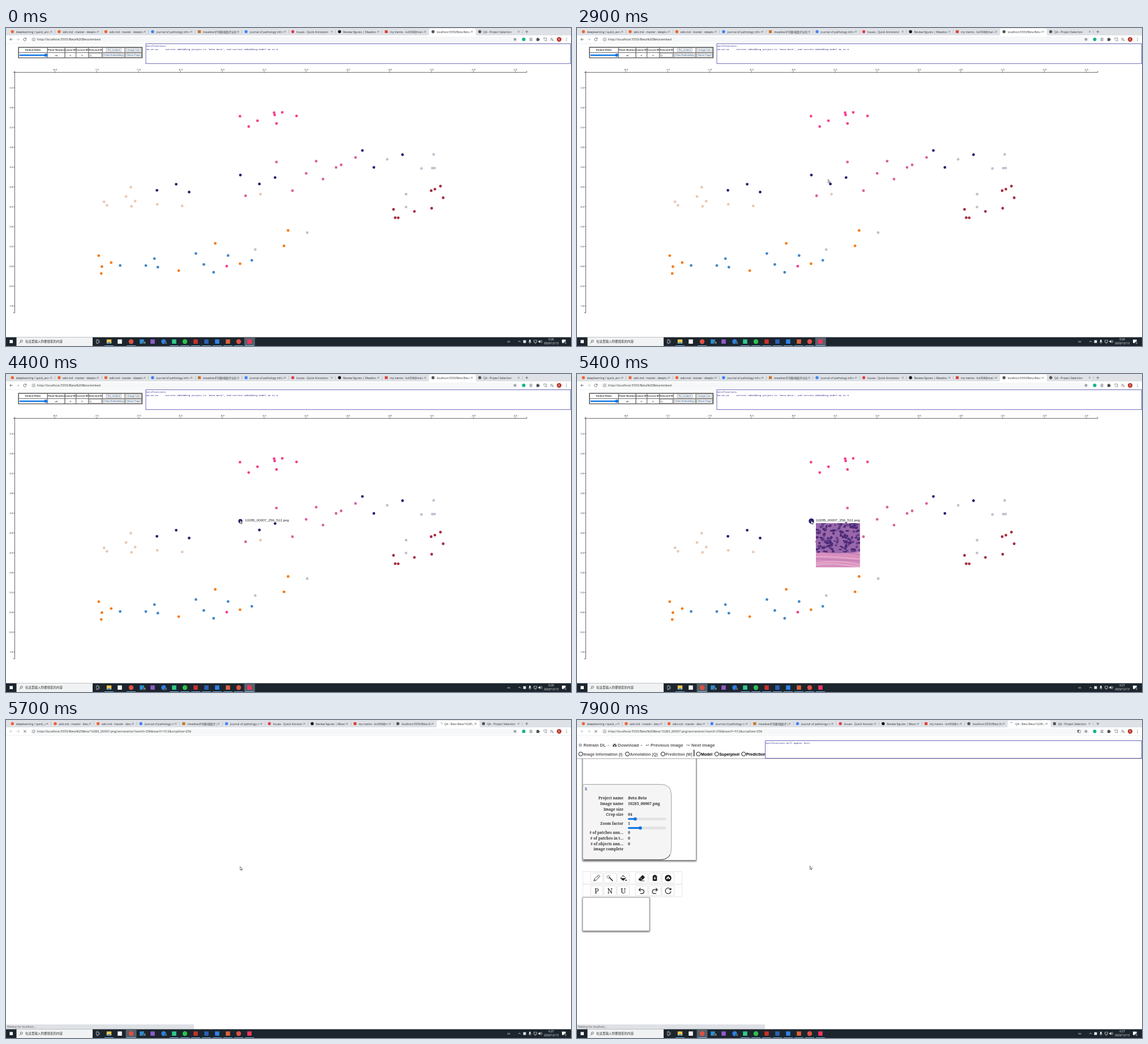
Write an HTML page that moves like this. It is 998 px wide and 561 px high and loops after 8 s.

```html
<!DOCTYPE html>
<html lang="en">
<head>
<meta charset="utf-8">
<title>Embedding viewer</title>
<style>
html, body { margin: 0; width: 100%; height: 100%; overflow: hidden; background: #fff; }
svg { display: block; }
text { white-space: pre; }
.ui { font-family: "Open Sans", "Noto Sans CJK SC", "Noto Sans CJK", sans-serif; }
.page { font-family: "Liberation Sans", Arial, sans-serif; }
.mono { font-family: "Liberation Mono", monospace; }
.serif { font-family: "Noto Serif", serif; }
.sym { font-family: "DejaVu Sans", sans-serif; }
.bold { font-weight: bold; }
</style>
</head>
<body>
<svg id="stage" width="998" height="561" viewBox="0 0 998 561"></svg>
<script>
const LOOP = 8000, STEP = 100;
const PROJECT = 'Beta Beta';
const HOST = 'http://localhost:5555/Beta%20Beta/';

// markup helpers
const rect = (x, y, w, h, fill, more = '') =>
  `<rect x="${x}" y="${y}" width="${w}" height="${h}" fill="${fill}" ${more}/>`;
const circle = (x, y, r, fill, more = '') =>
  `<circle cx="${x}" cy="${y}" r="${r}" fill="${fill}" ${more}/>`;
const line = (d, color, width = 0.8, more = '') =>
  `<path d="${d}" fill="none" stroke="${color}" stroke-width="${width}" ${more}/>`;
const shape = (d, fill) => `<path d="${d}" fill="${fill}"/>`;
const text = (x, y, s, size, cls, fill = '#222', more = '') =>
  `<text x="${x}" y="${y}" font-size="${size}" class="${cls}" fill="${fill}" ${more}>${s.replace(/&/g, '&amp;')}</text>`;
const group = (id, body, more = '') => `<g id="${id}" ${more}>${body}</g>`;
const MID = 'text-anchor="middle"', END = 'text-anchor="end"';
const edge = (color, width = 0.6) => `stroke="${color}" stroke-width="${width}"`;

function random(seed) {
  return () => (seed = (seed * 16807) % 2147483647) / 2147483647;
}

// browser window
const ORANGE = '#f0652f', GREY = '#5f6368';
const TABS = [
  ['deeplearning / quick_annotator', ORANGE],
  ['wiki.md · master · deeplearning', ORANGE],
  ['wiki.md · master · deeplearning', ORANGE],
  ['journal of pathology informatics', '#3b82f6'],
  ['meadow子刊影响因子分数出炉', '#c8762c', true],
  ['journal of pathology informatics', '#4285f4'],
  ['Issues · Quick Annotator', '#e04050'],
  ['Review figures | Meadow Field', '#111'],
  ['my memo - kvt508@mail.example', '#d9483b', true],
  [`localhost:5555/${PROJECT}/embed`, '#555'],
  ['QA - Project Selection', '#555']
];

function tabStrip(tabs, pitch, active) {
  let out = rect(0, 0, 998, 13, '#dee1e6');
  tabs.forEach(([title, color, square], i) => {
    const x = 11.3 + i * pitch, on = i === active, w = pitch - 20;
    if (on) out += shape(`M${x - 9} 13q2 0 2-2V3q0-2 2-2h${pitch - 4}q2 0 2 2v8q0 2 2 2z`, '#fff');
    else if (i !== active - 1) out += rect(x + pitch - 7.5, 3.5, 0.5, 6, '#9a9fa6');
    if (color) out += square ? rect(x - 2.6, 4, 5.2, 5, color) : circle(x, 6.5, 2.7, color);
    out += `<svg x="${x + 6.3}" y="0" width="${w}" height="13">` +
      text(0, 8.5, title, 5, 'ui', '#30343a') +
      rect(w - 8, 0, 8, 13, `url(#fade${on ? 1 : 0})`) + '</svg>';
    const c = x + pitch - 13.8;
    out += line(`M${c - 1.4} 5.1l2.8 2.8m0-2.8l-2.8 2.8`, '#50555b', 0.6);
  });
  return out + line('M917.3 6.6h5.2m-2.6-2.6v5.2', GREY, 0.8);
}

function windowFrame() {
  return rect(0, 13, 998, 14.5, '#fff') +
    rect(42, 15, 863, 10.6, '#f6f7f8', 'rx="5.3"') +
    rect(0, 27.2, 998, 0.5, '#dcdee1') +
    circle(48.9, 20.2, 2.5, 'none', edge(GREY)) + line('M48.9 19.8v1.8m0-3v.6', GREY, 0.6) +
    line('M950.8 6h4.4M969 4.5h3v3h-3zM970 4.4v-.9h3v3h-.9M987 3.5l4 4m0-4l-4 4', '#333', 0.6) +
    shape('M899 17l.9 2 2.1.2-1.6 1.4.5 2.1-1.9-1.1-1.9 1.1.5-2.1-1.6-1.4 2.1-.2z', GREY) +
    circle(899, 20.3, 0.9, '#fff') +
    circle(914.5, 20, 3.1, '#16b58a') +
    rect(924.8, 17.3, 4.8, 5.6, '#a4a8ad') + line('M925.6 19h3.2m-3.2 1.8h3.2', '#fff', 0.5) +
    rect(937, 18.2, 4.6, 4.6, '#4a4e53') + circle(939.3, 18, 1.1, '#4a4e53') + circle(941.8, 20.4, 1.1, '#4a4e53') +
    line('M949.7 19v-1.3h5.2v4.8h-2.4M949.7 20.2q2 .3 2.4 2.3', GREY, 0.7) +
    line('M961.5 18.2h4m-4 1.8h4m-4 1.8h2', GREY, 0.7) + circle(966, 21.5, 1, GREY) +
    circle(977, 20.1, 4.2, '#b8392c') + text(977, 21.8, 'K', 4.6, 'ui', '#fff', MID) +
    [17.8, 20, 22.2].map(y => circle(990, y, 0.6, '#4a4e53')).join('');
}

function navigation(loading) {
  const back = loading ? '#b6b9bd' : '#44484d';
  return line('M11.6 20.1H6.8m2.2-2.3l-2.3 2.3 2.3 2.3', back, 0.8) +
    line('M18.6 20.1h4.8m-2.2-2.3l2.3 2.3-2.3 2.3', '#b6b9bd', 0.8) +
    (loading ? line('M31.3 18l4.2 4.2m0-4.2l-4.2 4.2', '#44484d', 0.9)
      : line('M35.3 18.6a2.5 2.5 0 1 0 .5 2.2M35.8 17.3v2h-2', '#44484d', 0.8));
}

// taskbar
function taskbar() {
  const icons = [
    [201, '#f4f4f4', 1], [221, '#dd5144'], [240, '#2b8fd8', 1], [259, '#8f5bc8', 1], [278.5, '#2f7fe0'],
    [297, '#2fc98c', 1], [316, '#2dc14a'], [335, '#c8302c', 1], [354, '#2b5fb4', 1],
    [373, '#2f82e8', 1], [392, '#d8633c', 1], [411, '#dd5144'], [430, '#f0365f', 1]
  ];
  const running = [182, 221, 297, 316, 335, 354, 373, 392, 411, 430];
  return rect(0, 545.5, 998, 15.5, '#1c252d') +
    rect(6.4, 550.4, 5.6, 5.6, '#fff') +
    rect(18.5, 545.5, 134.5, 15.5, '#f1f2f3') +
    circle(27.3, 552.4, 1.9, 'none', edge('#333', 0.7)) + line('M26 553.8l-2.4 2.6', '#333', 0.7) +
    text(34, 555.4, '在这里输入你要搜索的内容', 5.5, 'ui', '#333') +
    rect('', 545.5, 19, 15.5, '#57616a', 'id="activeApp"') +
    line('M159.5 551h3.8v4.4h-3.8zM165 550.5v5.4M159.5 549.6h3.8m-3.8 7.2h3.8', '#dfe3e6', 0.6) +
    rect(177.8, 549.5, 8.4, 7, '#f4c84e') + rect(179.5, 554, 5, 2.5, '#3e9be0') +
    icons.map(([x, c, sq]) => sq ? rect(x - 3.8, 549.4, 7.6, 7.6, c) : circle(x, 553.2, 4.2, c)).join('') +
    circle(244, 555.5, 2.9, '#303a42') + text(244, 557.2, '14', 4.4, 'ui', '#fff', MID) +
    circle(282.4, 555.8, 2.3, '#303a42') + text(282.4, 557.4, '3', 4.2, 'ui', '#fff', MID) +
    running.map(x => rect(x - 8, 560, 16, 1, '#76b9ed')).join('') +
    text(888, 554.8, 'EK', 4.2, 'ui', '#fff', MID) +
    line('M904.8 554.2l2.2-2.2 2.2 2.2', '#fff', 0.7) + rect(913.6, 550.8, 4.8, 4.8, '#e8ecef') +
    rect(924.2, 549.8, 2.4, 4.4, '#fff', 'rx="1.2"') + line('M923.2 553q0 2.4 2.2 2.4t2.2-2.4m-2.2 2.4v1.4', '#fff', 0.5) +
    line('M932.5 550.8h5v3.6h-5zm1 5.4h3', '#fff', 0.6) +
    shape('M940.5 552h1.3l1.8-1.6v5.4l-1.8-1.6h-1.3z', '#fff') + line('M944.6 551.4q1.4 1.7 0 3.4m1.2-4.4q2.2 2.7 0 5.4', '#fff', 0.5) +
    text(963, 551.4, '', 4.9, 'ui', '#fff', MID + ' id="clock"') +
    text(963, 558.3, '2020/12/13', 4.9, 'ui', '#fff', MID) +
    shape('M982 549.8h6.6v5.4h-4l-1.4 1.5v-1.5H982z', '#fff') +
    circle(988.2, 555.6, 2.6, '#303a42') + text(988.2, 557.2, '3', 4.2, 'ui', '#fff', MID);
}

// scatter plot
const DOTS = {
  '#f4408f': '413.3,155.6 428.7,173.8 444.2,163.6 473.6,149.4 474.6,153.3 477.8,168.4 487.9,148.8 513.2,155.1 389.9,420.2',
  '#d9639f': '477.7,236.4 423.2,296 506,287 530.2,256.4 547.9,234.9 560,266.6 583,245.9 592,241.5 617.4,228.4',
  '#25206f': '629.5,216.1 700.4,223.5 649.8,245.9 414,259.4 447.6,275.2 475.3,263.8 300.6,275.6 266.6,286.3 323.5,289.4',
  '#e8c9b4': '220.4,280.8 212,297.3 228.2,305.4 173.2,306.7 178.4,312.8 221.7,314.7 267.2,311.1 311.2,313.9 449.5,293.2',
  '#c3c0d3': '755.4,223 673.3,231.6 733.8,247.9 753,247.2 757,247.1',
  '#c2c0c8': '706.7,293.2 706.6,315.8 532,361 440.2,390.8',
  '#a62c40': '767.4,279 757.6,284.3 751,287 772.2,299.5 751.9,318 721.4,323.6 684.5,320 687.5,334.7 692.8,334.8',
  '#f57c14': '498.3,357.2 491.1,384.3 369.6,379.9 163.8,401.6 185.8,413.8 169.4,421 168.2,433.1 305.1,428.1 413.4,415.8',
  '#4287c6': '201.6,418.9 247,419.1 262.2,406.8 268.2,421.9 335.4,397.8 349.4,417.2 366.8,431 392.3,401.4 434.2,409.8'
};

function axes() {
  let out = line('M15.4 75.8v2.5h904.4v-2.5M12.8 78.3h2.6v424.2h-2.6', '#222', 0.7);
  for (let i = 0; i < 12; i++) {
    const x = 86.3 + i * 73.93, y = 105.3 + i * 35;
    out += line(`M${x} 78.3v-2.5M12.8 ${y}h2.6`, '#222', 0.6) +
      text(x, 75.2, (-8 + i / 2).toFixed(1), 4.4, 'page', '#222', MID) +
      text(12.3, y + 1.5, (1.5 + i / 2).toFixed(1), 4.4, 'page', '#222', END);
  }
  return out;
}

const dots = () => Object.entries(DOTS).map(([color, list]) =>
  list.split(' ').map(p => circle(...p.split(','), 2.4, color)).join('')).join('');

function controls() {
  const cols = [22.3, 73.3, 104, 123.6, 145.6, 170.4, 210.3, 240.2];
  const heads = ['Embed Slider', 'Patch Number', 'Latest ID', 'Current ID', 'Selected ID'];
  const button = (x, y, w, label) => rect(x, y, w, 6.8, '#efefef', edge('#777', 0.5) + ' rx="0.8"') +
    text(x + w / 2, y + 5, label, 4.4, 'page', '#2a6099', MID);
  let out = rect(22, 34, 218.5, 18.6, '#fff', edge('#444', 1.2));
  cols.slice(0, 7).forEach((x, i) => [34.4, 43.5].forEach(y => {
    out += rect(x + 0.4, y, cols[i + 1] - x - 0.8, 8.8, 'none', edge('#555', 0.6));
  }));
  heads.forEach((h, i) => {
    const x = (cols[i] + cols[i + 1]) / 2;
    out += text(x, 40.4, h, 4.35, 'page bold', '#222', MID);
    if (i) out += i < 4 ? text(x, 49.5, i === 1 ? 'all' : '0', 4.4, 'page', '#222', MID) : '';
  });
  return out + rect(23.5, 46.7, 49, 2.6, '#0b75e8', 'rx="1.3"') + circle(70.2, 48, 2.8, '#0b75e8') +
    rect(147, 44.6, 21.4, 6.6, '#fff', edge('#777', 0.6)) + text(148.5, 49.5, '0', 4.4, 'page') +
    button(177, 35.3, 26.5, 'Re_embed') + button(212.5, 35.3, 25.5, 'Image List') +
    button(172, 44.4, 36.5, 'View Embedding') + button(212, 44.4, 26.5, 'Home Page');
}

const notice = (x, y, h, lines) => rect(x, y, 997.6 - x, h, '#fff', edge('#4444aa', 0.8)) +
  lines.map((s, i) => text(x + 1, y + 5.3 + i * 5.8, s, 4.31, 'mono', '#17178a')).join('');

// soft tissue sketch: pink stroma with bands of purple nuclei
function tissue(seed, bands) {
  const rnd = random(seed);
  let out = rect(0, 0, 78, 78, '#d78fbd');
  for (let i = 0; i < 16; i++) {
    const y = rnd() * 78;
    out += line(`M0 ${y}Q${20 + rnd() * 38} ${y - 8 + rnd() * 10} 78 ${y + 4}`, i % 2 ? '#e9b3d3' : '#b978b0', 1 + rnd());
  }
  bands.forEach(([left, right, height, count]) => {
    out += shape(`M0 ${left}Q40 ${(left + right) / 2 + 3} 78 ${right}v${height}Q40 ${(left + right) / 2 + height + 4} 0 ${left + height}z`, '#9a68aa');
    for (let i = 0; i < count; i++) {
      const x = rnd() * 78, y = left + (right - left) * x / 78 + rnd() * height;
      out += `<ellipse cx="${x}" cy="${y}" rx="${1.8 + rnd()}" ry="${1.4 + rnd()}" fill="${i % 3 ? '#4d2b78' : '#65408c'}"/>`;
    }
  });
  return out;
}

const HOVERS = [
  { x: 447.6, y: 275.2, from: 3500, label: 3600, image: 3800, until: 4300, name: '10285_00007_0_0.png', art: tissue(7, [[-2, 0, 27, 95], [64, 70, 16, 55]]) },
  { x: 414, y: 259.4, from: 4400, label: 4400, image: 4500, until: 5500, name: '10285_00007_256_512.png', art: tissue(31, [[-2, -2, 53, 170]]) }
];
const hover = (h, i) => group('hover' + i,
  circle(h.x, h.y, 2.4, '#25206f') +
  group('label' + i, text(h.x + 8, h.y + 0.1, h.name, 6.23, 'page', '#222')) +
  group('image' + i, `<svg x="${h.x + 7.9}" y="${h.y + 3.9}" width="78" height="78">${h.art}</svg>`));

// annotation page
const BUTTONS = [24, 47.5, 71, 103.2, 126.7, 150.2];

function annotationPage() {
  const rows = [
    ['Project name', PROJECT, 138], ['Image name', '10285_00007.png', 147.6], ['Image size', '', 157.2],
    ['Crop size', '64', 167], ['Zoom factor', '1', 183], ['# of patches ann…', '0', 199],
    ['# of patches in t…', '0', 208.6], ['# of objects ann…', '0', 218.2], ['image complete', '', 228]
  ];
  const radios = [[6.5, 'Image Information (I)'], [89, 'Annotation (Q)'], [151.8, 'Prediction (W)'],
    [214.5, 'Model'], [246.8, 'Superpixel'], [294.3, 'Prediction']];
  const slider = (y, x) => rect(90, y - 1.4, 66.5, 2.8, '#efefef', edge('#aaa', 0.5) + ' rx="1.4"') +
    rect(90, y - 1.4, x - 90, 2.8, '#0b75e8', 'rx="1.4"') + circle(x, y, 2.9, '#0b75e8');
  const menu = (x, s) => text(x, 47.3, s, 7.8, 'page bold', '#5a5a5a');
  return rect(10, 60, 200.5, 187.5, '#fff', edge('#555') + ' filter="url(#shadow)"') +
    rect(0, 28, 998, 40, '#fff') + rect(0, 67.7, 998, 0.8, '#888') +
    text(2.4, 47, '⚙', 7.5, 'sym', '#555') + menu(11.5, 'Retrain DL') + rect(54, 44.6, 2.6, 0.9, '#666') +
    rect(63, 43.5, 7, 3.6, '#555', 'rx="0.8"') + rect(64.8, 41.9, 3.4, 2, '#555') + circle(66.5, 45.3, 1, '#fff') +
    menu(72, 'Download') + rect(112.8, 44.6, 2.6, 0.9, '#666') +
    text(121.5, 47, '↩', 7.5, 'sym', '#555') + menu(130, 'Previous image') +
    text(193, 47, '↪', 7.5, 'sym', '#555') + menu(202, 'Next image') +
    radios.map(([x, s], i) => circle(x, 60, 3.5, '#fff', edge('#111', 1)) +
      text(x + 4.4, 62.5, s, 7.02, 'page bold', i < 3 ? '#5a5a5a' : '#000')).join('') +
    rect(206, 52.5, 1.3, 11.5, '#111') +
    notice(332.6, 36.6, 31, ['Notifications will appear here.']) +
    `<path d="M14 113.6H148Q166.5 113.6 166.5 132V228Q166.5 246.5 148 246.5H14Q10 246.5 10 242.5V117.6Q10 113.6 14 113.6z" fill="#f5f5f5" stroke="#777" stroke-width="0.7"/>` +
    line('M12 246.4H148Q160 246 164.5 237', '#444', 0.9) +
    text(13.4, 124, 'X', 6.4, 'serif bold', '#2c5f9e') +
    rows.map(([k, v, y], i) => text(82, y + 2.3, k, 6.6, 'serif bold', '#333', END) +
      text(90, y + 2.3, v, 6.9, 'serif bold', '#333', i ? '' : 'font-style="italic"')).join('') +
    slider(174.6, 102.8) + slider(190.5, 111.8) +
    [267.4, 290].map(y => rect(10.4, y, 175, 22, '#fff', edge('#ddd', 0.7)) +
      BUTTONS.map(x => rect(x, y + 2.6, 21.6, 17.4, '#fff', edge('#ccc', 0.6) + ' rx="1.6"')).join('')).join('') +
    rect(10, 313, 118, 59, '#fff', edge('#666') + ' filter="url(#shadow)"');
}

const at = (i, y, body) => `<g transform="translate(${BUTTONS[i] + 10.8} ${y})">${body}</g>`;

function drawingTools() {
  const y = 278.9, ink = '#222';
  return at(0, y, line('M-5.2 5.2l1-3.6L2.4-4.6q1.6-1.2 2.6 0t0 2.4L-1.6 4.2zM1.2-3.4l2.4 2.4M-4.2 1.6l2.6 2.6', ink, 0.8)) +
    at(1, y, line('M5 5L-1.4-1.4', ink, 1.6) + line('M-2.6-5.4v2m0 2.4v2m-4-3.2h2.2m2.6 0h2.2M-5-4.8l1.2 1.2M.2-4.8L-1-3.6M-5 .4l1.2-1.2', ink, 0.7)) +
    at(2, y, line('M-5 .4L0-4.6l4.4 4.4-4.6 4.4zM-1.6-5.4L1-2.6', ink, 0.9) + shape('M-4.8.2h9L-.2 4.4z', ink) + circle(4.8, 3.8, 1.2, ink)) +
    at(3, y, shape('M-5.6 2.4L.8-4.6q1-1 2 0l2.4 2.2q1 1 0 2L.4 4.6h-4z', ink) + line('M-2.4-.6L2 3.4M-1 4.6h6', '#fff', 0.8) + line('M-2 5h7.4', ink, 0.8)) +
    at(4, y, rect(-3.8, -4.6, 7.6, 9.6, ink, 'rx="1.6"') + rect(-2, -5.6, 4, 2, ink) + shape('M.8-3L-2 .8h1.6L-.8 3.6 2-.4H.4z', '#fff')) +
    at(5, y, circle(0, 0, 5.7, '#111') + shape('M-3.4 1.8q-.4-2 1.4-2.4.4-2.4 2.4-2.2 1.6.2 1.8 2 1.8.4 1.4 2.6z', '#fff') + line('M0 4V0m-1.4 1.4L0 0l1.4 1.4', '#111', 0.8));
}

function labelTools() {
  const y = 301.4;
  return ['P', 'N', 'U'].map((s, i) => at(i, y, text(0, 4.5, s, 12.4, 'serif', '#222', MID))).join('') +
    at(3, y, line('M-1.6-5L-4.6-2l3 3M-4.4-2H1Q4.4-1.8 4.4 1.4T1 4.8H-2.4', '#222', 1.2)) +
    at(4, y, line('M1.6-5l3 3-3 3M4.4-2H-1Q-4.4-1.8-4.4 1.4T-1 4.8H2.4', '#222', 1.2)) +
    at(5, y, line('M4.4-2.4A5 5 0 1 0 5 .8M5-5.2v3.2H1.8', '#222', 1.2));
}

const newTabs = [...TABS.slice(0, 10), [`QA - ${PROJECT}/10285_00007.png`, null], TABS[10]];
const stage = document.getElementById('stage');
stage.innerHTML = `<defs>
  ${['#dee1e6', '#fff'].map((c, i) => `<linearGradient id="fade${i}"><stop stop-color="${c}" stop-opacity="0"/><stop offset="1" stop-color="${c}"/></linearGradient>`).join('')}
  <filter id="shadow" x="-10%" y="-10%" width="120%" height="125%"><feDropShadow dx="0" dy="1.4" stdDeviation="1.6" flood-opacity="0.65"/></filter>
  </defs>` +
  rect(0, 0, 998, 561, '#fff') + windowFrame() +
  group('embed', tabStrip(TABS, 82.55, 9) + navigation(false) + text(55, 22.1, HOST + 'embed', 5.64, 'ui', '#333') +
    controls() + notice(247, 27.8, 35, ['Notifications:', `00:26:19     Current embedding project is '${PROJECT}', and current embedding Model ID is 0`]) +
    axes() + dots() + HOVERS.map(hover).join('')) +
  group('annotate', tabStrip(newTabs, 75.65, 10) + navigation(true) +
    text(55, 22.1, HOST + '10285_00007.png/annotation?startX=256&startY=512&cropSize=256', 5.64, 'ui', '#333') +
    circle(767.8, 6.5, 2.5, 'none', edge('#6f8fcf', 0.8) + ' id="spinner"') +
    group('content', annotationPage()) + group('labelTools', labelTools()) + group('drawTools', drawingTools()) +
    group('translate', rect(883.8, 17.4, 3.4, 4.6, '#666') + rect(886, 18.6, 3.2, 4.2, '#fff', edge('#666', 0.6))) +
    group('status', rect(0, 537, 332, 8.5, '#dee1e6') + text(2, 543, 'Waiting for localhost...', 4.9, 'ui', '#555'))) +
  taskbar() +
  group('cursor', `<path d="M0 0V6.1L1.4 4.8 2.4 7 3.3 6.6 2.4 4.5H4.2z" fill="#fff" stroke="#222" stroke-width="0.6"/>`);

// time, x, y of the pointer tip
const POINTER = [
  [800, 943, 285], [900, 666, 271], [1000, 495, 247], [1100, 436, 228], [1200, 392.4, 143.6],
  [1500, 392.6, 148], [1600, 393.8, 159.4], [1900, 393.6, 152.6],
  [2500, 395, 158], [2600, 410, 172], [2700, 424, 204], [2800, 435.5, 248], [2900, 443.5, 267],
  [3000, 446, 270], [3100, 448, 272], [3300, 448.6, 272.6],
  [4200, 445, 271], [4300, 425, 262], [4400, 413.4, 258], [4500, 413.6, 258.6], [7500, 411.5, 257.4]
];
const el = id => document.getElementById(id);
const show = (id, on) => { el(id).style.display = on ? '' : 'none'; };

function render(now) {
  const t = Math.floor((now % LOOP) / STEP) * STEP;
  const opened = t >= 5500;
  show('embed', !opened);
  show('annotate', opened);
  show('status', t >= 5600);
  show('content', t >= 6300);
  show('labelTools', t >= 6800);
  show('drawTools', t >= 7100);
  show('translate', t >= 7300);

  HOVERS.forEach((h, i) => {
    show('hover' + i, t >= h.from && t < h.until);
    show('label' + i, t >= h.label);
    show('image' + i, t >= h.image);
    el('hover' + i).firstChild.setAttribute('r', t === h.from ? 3.6 : 4.7);
  });

  const arc = 3 + 2.5 * Math.cos((t - 5700) / 1000 * Math.PI);
  el('spinner').setAttribute('stroke-dasharray', `${arc} 20`);
  el('spinner').setAttribute('transform', `rotate(${-90 - (t - 5700) * 0.36} 767.8 6.5)`);

  const returned = t >= 5300;
  el('activeApp').setAttribute('x', returned ? 211.5 : 420.8);
  el('clock').textContent = returned ? '0:27' : '0:26';

  const tip = POINTER.filter(p => p[0] <= t).pop();
  show('cursor', tip);
  if (tip) el('cursor').setAttribute('transform', `translate(${tip[1]} ${tip[2]})`);
}

const start = performance.now();
function tick() {
  render(performance.now() - start);
  requestAnimationFrame(tick);
}
tick();
</script>
</body>
</html>
```
